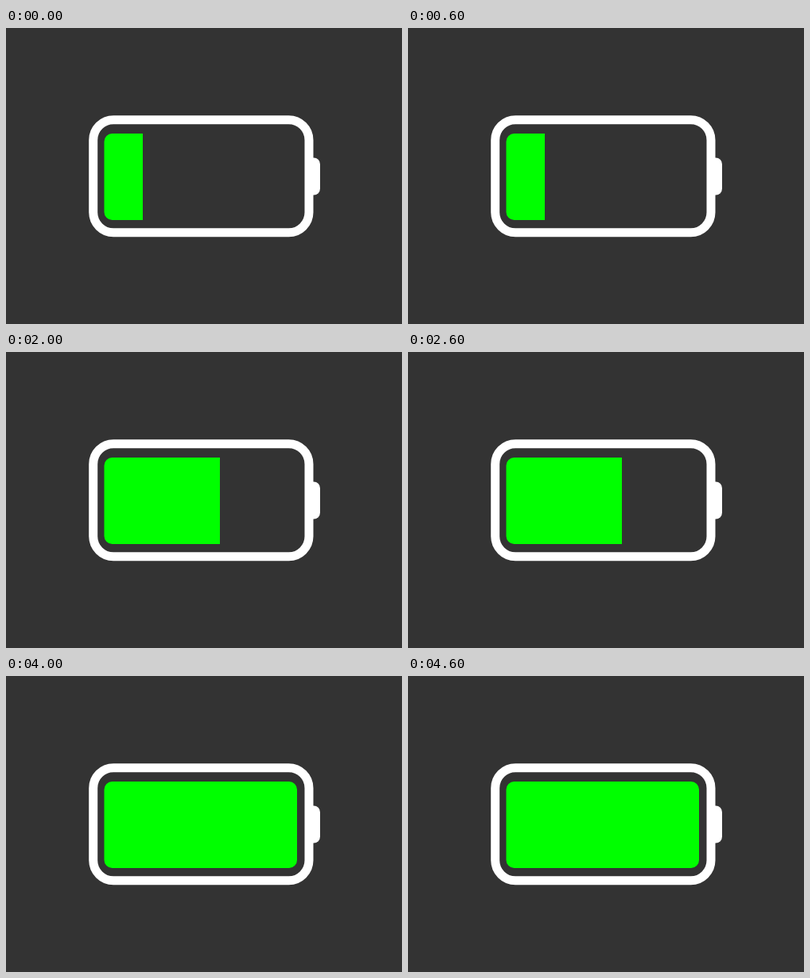
Write an HTML page with a canvas that moves like this. It is 498 px wide and 373 px high and loops after 5 s.

```html
<!DOCTYPE html>
<html lang="en">
<head>
<meta charset="utf-8">
<title>Battery charging</title>
<style>
  html, body { margin: 0; width: 100%; height: 100%; overflow: hidden; background: #333; }
  canvas { display: block; }
</style>
</head>
<body>
<canvas id="stage" width="498" height="373"></canvas>
<script>
const ctx = document.getElementById('stage').getContext('2d');
const STEP_MS = 1000;
const STEPS = 5;
const CELL = { x: 123.5, y: 133, w: 242.5, h: 109, r: 10 };

function roundRect(x, y, w, h, radii) {
  ctx.beginPath();
  ctx.roundRect(x, y, w, h, radii);
}

function drawCase() {
  ctx.strokeStyle = ctx.fillStyle = '#fff';
  ctx.lineWidth = 11;
  roundRect(109.7, 115.7, 271.3, 142.1, 25.5);
  ctx.stroke();
  roundRect(385, 163.5, 10, 47, [0, 8, 8, 0]);
  ctx.fill();
}

function drawCharge(level) {
  const { x, y, w, h, r } = CELL;
  const right = level === STEPS ? r : 0;
  ctx.fillStyle = '#0f0';
  roundRect(x, y, w * level / STEPS, h, [r, right, right, r]);
  ctx.fill();
}

function draw(time) {
  const level = Math.floor(time / STEP_MS) % STEPS + 1;
  ctx.fillStyle = '#333';
  ctx.fillRect(0, 0, 498, 373);
  drawCase();
  drawCharge(level);
}

const start = performance.now();
function tick() {
  draw(performance.now() - start);
  requestAnimationFrame(tick);
}
tick();
</script>
</body>
</html>
```
